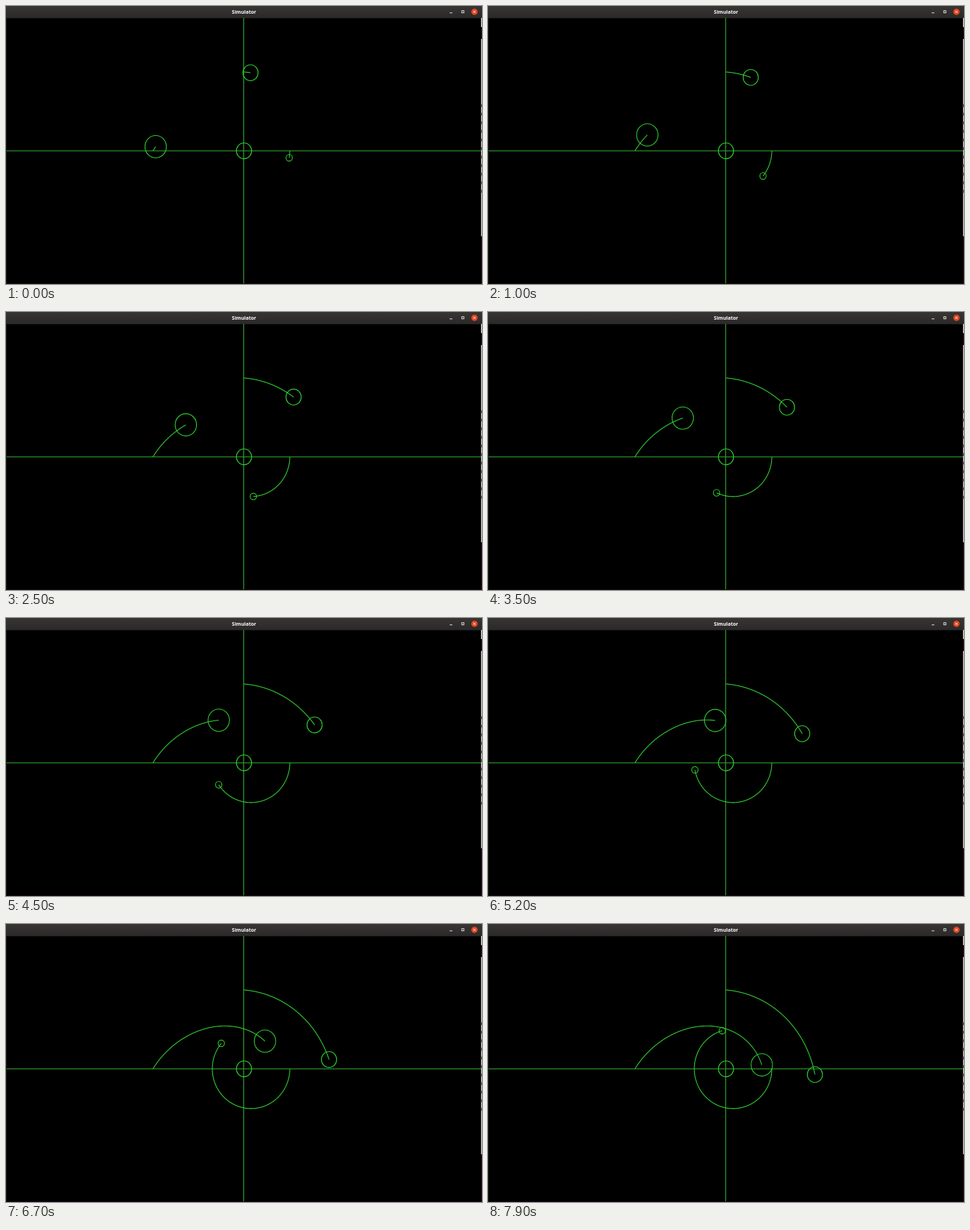
An HTML page with a canvas for the animation above (8000 ms loop, 676 by 396 pixels).

```html
<!DOCTYPE html>
<html lang="en">
<head>
<meta charset="utf-8">
<title>Simulator</title>
<style>
html, body { margin: 0; width: 100%; height: 100%; overflow: hidden; background: #000; }
canvas { display: block; }
</style>
</head>
<body>
<canvas id="stage" width="676" height="396"></canvas>
<script>
const ctx = document.getElementById('stage').getContext('2d');
const LOOP = 8000, FRAME = 100;
const CX = 338, CY = 206.3, STRETCH = 1.046; // the sun; the view is slightly taller than wide
const GRAVITY = 55 ** 3, STEP = 0.004;

// Orbits around the sun: distance = size / (1 - ecc * cos(angle - far)).
const bodies = [
  { radius: 10.8, size: 136.8, ecc: 0.291, far: 1.917, start: -Math.PI / 2 },
  { radius: 15.2, size: 74.6, ecc: 0.563, far: 2.421, start: Math.PI },
  { radius: 4.5, size: 53.2, ecc: 0.182, far: 0, start: 0 }
];

// Simulated time: it slows down twice as the trails grow.
function clock(s) {
  return 0.208 + 0.595 * s - 0.112 * Math.max(0, s - 2.5) - 0.038 * Math.max(0, s - 6.7);
}

function rect(color, x, y, w, h) {
  ctx.fillStyle = color;
  ctx.fillRect(x, y, w, h);
}

function line(x1, y1, x2, y2) {
  ctx.beginPath();
  ctx.moveTo(x1, y1);
  ctx.lineTo(x2, y2);
  ctx.stroke();
}

function pen(color, width) {
  ctx.strokeStyle = color;
  ctx.lineWidth = width;
}

function ring(x, y, radius) {
  ctx.beginPath();
  ctx.ellipse(x, y, radius, radius * STRETCH, 0, 0, 2 * Math.PI);
  ctx.stroke();
}

function drawWindow() {
  rect('#000', 0, 0, 676, 396);
  const bar = ctx.createLinearGradient(0, 0, 0, 17);
  bar.addColorStop(0, '#383533');
  bar.addColorStop(1, '#2b2929');
  rect(bar, 0, 0, 676, 17.4);
  rect('#1d1a1c', 0, 17, 1, 379);
  rect('#190a14', 0, 395, 676, 1);
  rect('#2a1024', 675, 17, 1, 379);
  rect('#e8e8e8', 674.7, 17, 1.3, 13);
  rect('#d8d8d8', 674.7, 47, 1.3, 281);
  for (let y = 140; y < 270; y += 12.2) rect('#555', 675, y, 1, 4);

  ctx.fillStyle = '#fff';
  ctx.font = 'bold 7px "Noto Sans", "Open Sans", sans-serif';
  ctx.textAlign = 'center';
  ctx.fillText('Simulator', CX, 11);

  pen('#ddd', 1);
  line(630, 9.8, 634, 9.8);
  ctx.strokeRect(647.3, 6.7, 3, 3);
  ctx.fillStyle = '#e5431f';
  ctx.beginPath();
  ctx.arc(665.3, 8.3, 4.5, 0, 2 * Math.PI);
  ctx.fill();
  pen('#fff', 0.9);
  line(663.7, 6.7, 666.9, 9.9);
  line(666.9, 6.7, 663.7, 9.9);
}

// Follows the equal-area law from the start, leaving a trail.
function drawBody({ radius, size, ecc, far, start }, time) {
  const sweep = Math.sqrt(GRAVITY * size);
  const steps = Math.ceil(time / STEP), dt = time / steps;
  let angle = start, x, y;
  ctx.beginPath();
  for (let i = 0; i <= steps; i++) {
    const r = size / (1 - ecc * Math.cos(angle - far));
    x = CX + r * Math.cos(angle);
    y = CY + r * Math.sin(angle) * STRETCH;
    ctx.lineTo(x, y);
    angle += sweep / (r * r) * dt;
  }
  ctx.stroke();
  ring(x, y, radius);
}

function draw(now) {
  const t = Math.floor(now % LOOP / FRAME) * FRAME;
  drawWindow();
  pen('#2b8f2b', 1.4);
  line(1, 206.4, 675, 206.4);
  line(337.5, 17, 337.5, 395);
  pen('#2fd02f', 1.1);
  ring(CX, CY, 10.8);
  for (const body of bodies) drawBody(body, clock(t / 1000));
  requestAnimationFrame(draw);
}
requestAnimationFrame(draw);
</script>
</body>
</html>
```
